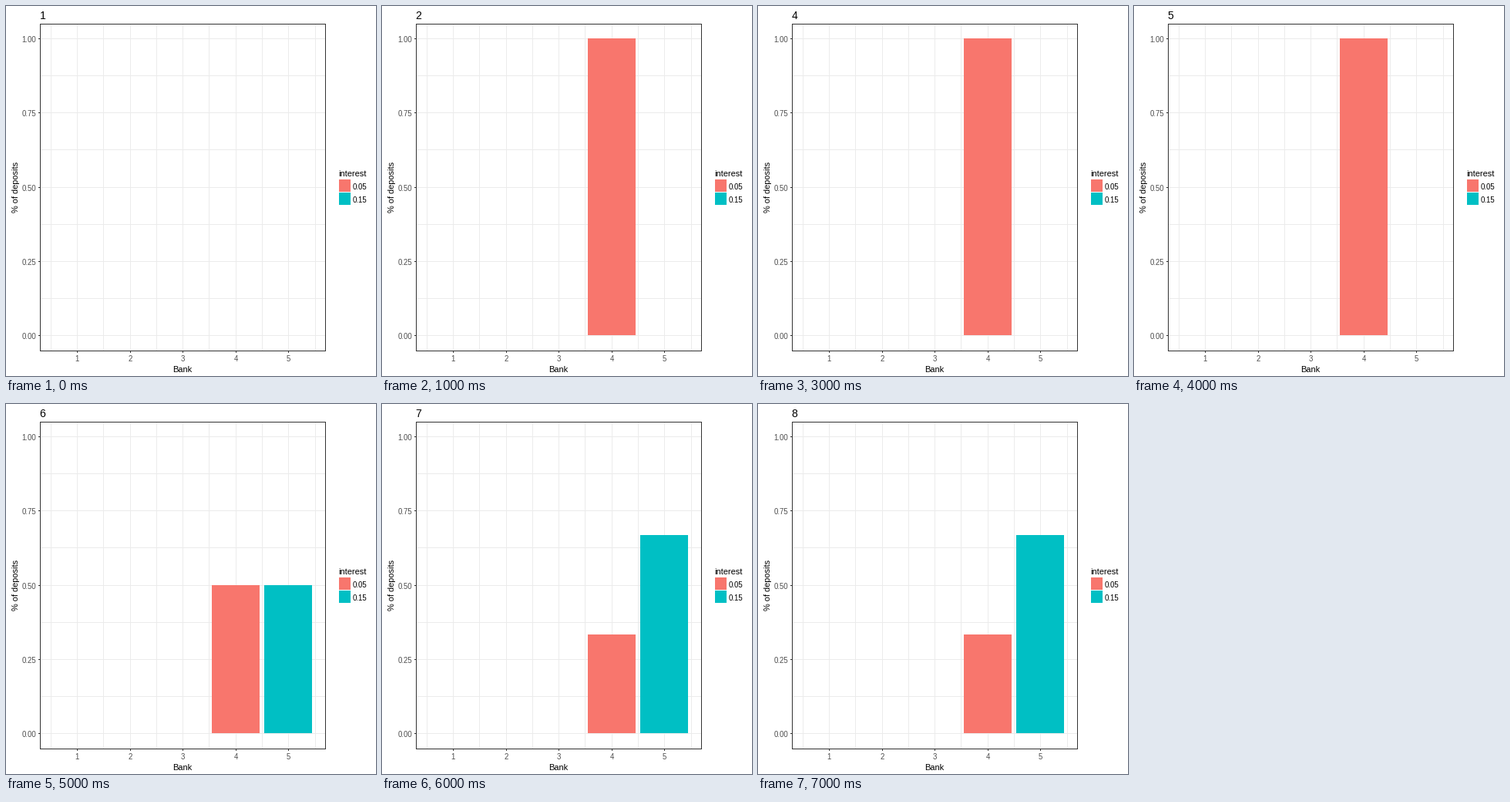
A matplotlib script that plays this animation: 480x480 px, repeating every 8000 ms.

```python
import matplotlib.pyplot as plt
from matplotlib.animation import FuncAnimation
from matplotlib.patches import Rectangle

SIZE, DPI = 480, 100
RED, TEAL = "#F8766D", "#00BFC4"
GRID, DARK, LABEL = "#EBEBEB", "#333333", "#4D4D4D"
LEFT, RIGHT, TOP, BOTTOM = 44, 414, 23, 447
SMALL, MEDIUM, LARGE = 9.6, 11, 14

plt.rcParams["font.family"] = "Liberation Sans"
fig = plt.figure(figsize=(SIZE / DPI, SIZE / DPI), dpi=DPI, facecolor="white")
ax = fig.add_axes([0, 0, 1, 1])
ax.set_xlim(0, SIZE)
ax.set_ylim(SIZE, 0)
ax.axis("off")


def bank_x(bank):
    return 24 + 68.55 * bank


def share_y(share):
    return 427.5 - 385 * share


def box(x, y, w, h, color, z=1):
    patch = Rectangle((x, y), w, h, fc=color, lw=0, antialiased=False, zorder=z)
    return ax.add_patch(patch)


def label(x, y, text, px, color="black", **kw):
    return ax.text(x, y, text, fontsize=px * 72 / DPI, color=color,
                   va="baseline", zorder=6, **kw)


# Grid, minor and major
for i in range(11):
    box(int(bank_x(0.5 + i / 2)), TOP, 1, BOTTOM - TOP, GRID)
for i in range(9):
    box(LEFT, int(share_y(i / 8)), RIGHT - LEFT, 1, GRID)

# Panel border
for y in (TOP, BOTTOM - 1):
    box(LEFT, y, RIGHT - LEFT + 1, 1, DARK, 4)
for x in (LEFT, RIGHT):
    box(x, TOP, 1, BOTTOM - TOP, DARK, 4)
ax.patches[-3].set_y(BOTTOM)
for x in (LEFT, RIGHT):
    box(x, BOTTOM - 1, 1, 2, DARK, 4)

# Axes
for bank in range(1, 6):
    x = int(bank_x(bank))
    box(x, BOTTOM + 1, 1, 2, DARK)
    label(x + 0.3, 461, str(bank), SMALL, LABEL, ha="center")
for i in range(5):
    y = int(share_y(i / 4))
    box(LEFT - 2, y, 2, 1, DARK)
    label(39.5, y + 5, f"{i / 4:.2f}", SMALL, LABEL, ha="right")
label(229, 475, "Bank", MEDIUM, ha="center")
label(16, 235, "% of deposits", MEDIUM, rotation=90,
      rotation_mode="anchor", ha="center")

# Legend
label(431, 221, "interest", MEDIUM)
for y, color, text in ((225, RED, "0.05"), (242, TEAL, "0.15")):
    box(432, y, 15, 16, color)
    label(449.5, y + 13, text, SMALL)

title = label(43.5, 17, "", LARGE)
bars = [box(x, 427, 62, 0, color, 3) for x, color in ((267, RED), (335, TEAL))]


def shares(step):
    """Share of deposits held by banks 4 and 5."""
    if step == 1:
        return 0, 0
    if step <= 5:
        return 1, 0
    if step == 6:
        return 1 / 2, 1 / 2
    return 1 / 3, 2 / 3


def draw(frame):
    step = frame + 1
    title.set_text(str(step))
    for bar, share in zip(bars, shares(step)):
        top = int(share_y(share))
        bar.set_y(top)
        bar.set_height(427 - top)
        bar.set_visible(share > 0)
    return [title, *bars]


anim = FuncAnimation(fig, draw, frames=8, interval=1000, repeat=True,
                     repeat_delay=0)
plt.show()
```
